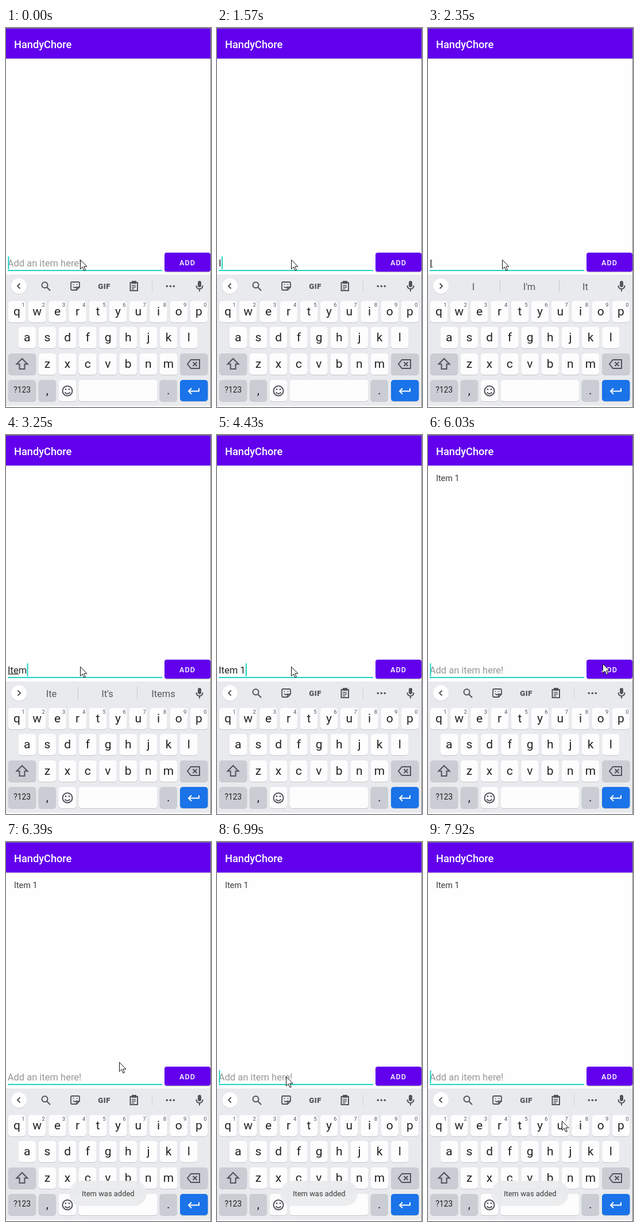
An HTML page that plays this animation: 357x658 px, repeating every 8000 ms.

```html
<!DOCTYPE html>
<html lang="en">
<head>
<meta charset="utf-8">
<title>To-do list</title>
<style>
  html, body { margin: 0; width: 100%; height: 100%; overflow: hidden; background: #fff; }
  svg { display: block; width: 357px; height: 658px; font-family: Roboto, "Noto Sans", sans-serif; }
  text { white-space: pre; }
  .mid { text-anchor: middle; }
  .icon { fill: none; stroke: #505359; stroke-width: 2; }
</style>
</head>
<body>
<svg viewBox="0 0 357 658">
  <defs>
    <clipPath id="btnClip"><rect x="276" y="390" width="80" height="33" rx="4"/></clipPath>
  </defs>
  <rect width="357" height="658" fill="#fefefe"/>
  <rect y="53" width="357" height="1.5" fill="#000" opacity=".1"/>
  <rect width="357" height="53" fill="#6200ee"/>
  <text x="14" y="35" font-size="18.2" font-weight="500" fill="#fff">HandyChore</text>
  <text id="item" x="14" y="80" font-size="14.4" fill="#3a3a3a">Item 1</text>

  <rect x="3" y="420" width="269" height="2" fill="#1fd3c6"/>
  <text id="hint" x="2.7" y="413.5" font-size="16.5" fill="#989898">Add an item here!</text>
  <text id="typed" x="3" y="413.5" font-size="16.5" fill="#222"></text>
  <rect id="under" x="3.5" y="414.5" height="1.2" fill="#222"/>
  <rect id="caret" y="396.5" width="2" height="22.5" fill="#1fd3c6"/>

  <rect id="lift" x="275.5" y="392" width="81" height="35" rx="5" fill="#000" opacity=".16"/>
  <rect x="276" y="391" width="80" height="33.5" rx="4" fill="#000" opacity=".2"/>
  <rect x="276" y="390" width="80" height="33" rx="4" fill="#6200ee"/>
  <circle id="ripple" cx="306" cy="400" fill="#fff" opacity=".24" clip-path="url(#btnClip)"/>
  <text x="302" y="411.5" font-size="12.6" font-weight="500" letter-spacing="1.12" fill="#fff">ADD</text>

  <rect y="428" width="357" height="228" fill="#e8eaed"/>
  <circle cx="22.5" cy="448.8" r="13.8" fill="#000" opacity=".1"/>
  <circle cx="22.5" cy="448" r="13.5" fill="#fff"/>
  <path id="chevron" class="icon"/>

  <g id="tools" class="icon">
    <circle cx="67.5" cy="446.3" r="5"/><path d="M71 450l6 6"/>
    <path d="M115 441h11q2 0 2 2v7l-5 5h-8q-2 0-2-2v-10q0-2 2-2zM128 450h-3q-2 0-2 2v3M117 449q3 4 6 0M117.5 444.5v1.5M123.5 444.5v1.5" stroke-width="1.8"/>
    <text class="mid" x="171.2" y="452.8" font-size="13.2" font-weight="900" letter-spacing=".5" fill="#505359" stroke="none">GIF</text>
    <path d="M216.5 442h12.5v14h-12.5z"/>
    <path d="M219 447h7M219 450h7M219 453h4.5" stroke-width="1.5"/>
    <path d="M220 440h6v3h-6z" fill="#505359"/>
    <path d="M254.5 438v20" stroke="#d0d2d6" stroke-width="1"/>
    <g fill="#505359" stroke="none">
      <circle cx="280.3" cy="448.3" r="1.8"/><circle cx="286.3" cy="448.3" r="1.8"/><circle cx="292.3" cy="448.3" r="1.8"/>
    </g>
  </g>
  <g id="words" font-size="16.5" fill="#56595e">
    <text class="mid" x="79" y="455"></text>
    <text class="mid" x="176.5" y="455"></text>
    <text class="mid" x="274" y="455"></text>
    <path d="M125.5 437v22M228.5 437v22" stroke="#c6c9cd"/>
  </g>
  <rect x="334" y="439" width="6" height="11" rx="3" fill="#505359"/>
  <path class="icon" d="M331.5 447q0 6 5.5 6t5.5-6M337 453v4.5" stroke-width="1.8"/>

  <g id="keys"></g>
  <path class="icon" d="M28 574l-9.5 9.5h5v8.5h9v-8.5h5z"/>
  <path class="icon" d="M322 576h15v15h-15l-6-7.5zM325.5 580l7 7M332.5 580l-7 7"/>
  <g class="icon">
    <circle cx="107" cy="630" r="8.5"/><path d="M102.5 632.5q4.5 5 9 0"/>
    <path d="M104 626v2.5M110 626v2.5" stroke-width="2.4"/>
  </g>
  <path class="icon" style="stroke:#fff" d="M336 625.5v5h-18M323 625.5l-5 5 5 5"/>

  <g id="toast">
    <rect x="110" y="588" width="135" height="44" rx="22" fill="#eaebec" opacity=".93"/>
    <text class="mid" x="177.8" y="615" font-size="12.95" fill="#3a3a3a">Item was added</text>
  </g>
  <path d="M0 .5h356.5v657.5" fill="none" stroke="#808080"/>
  <path id="mouse" d="M0 0v16l3.7-3.5 2.7 6.2 2.5-1-2.7-6h5.2z" fill="#fff" stroke="#111" stroke-linejoin="round"/>
</svg>
<script>
const $ = id => document.getElementById(id);

// Keyboard
const WHITE = '#fdfdfe', GREY = '#cacdd4', PITCH = 35.2;
let keys = '';
function key(x, y, w, label = '', fill = WHITE, size = 21) {
  const box = (dy, color) => `<rect x="${x}" y="${y + dy}" width="${w}" height="37" rx="5" fill="${color}"/>`;
  keys += box(1, '#c3c6ca') + box(0, fill) +
    `<text class="mid" x="${x + w / 2}" y="${y + 17.4 + size * 0.34}" font-size="${size}" fill="#202124">${label}</text>`;
}
function row(letters, x, y) {
  [...letters].forEach((c, i) => key(x + i * PITCH, y, 30.5, c));
}
row('qwertyuiop', 3.8, 474);
[...'1234567890'].forEach((n, i) => {
  keys += `<text class="mid" x="${30 + i * PITCH}" y="484" font-size="9.5" fill="#505359">${n}</text>`;
});
row('asdfghjkl', 21.5, 519);
row('zxcvbnm', 56.6, 565);
key(3.8, 565, 48.5, '', GREY);
key(303, 565, 48.5, '', GREY);
key(3.8, 611, 48.5, '?123', GREY, 13.8);
key(56.6, 611, 30.5, ',', GREY);
key(91.8, 611, 30.5);
key(126.5, 611, 137);
key(267.5, 611, 30.5, '.', GREY);
key(303, 611, 48.5, '', '#1a73e8');
$('keys').innerHTML = keys;

// Each step changes part of the screen state from its time on
const steps = [
  [0, { text: '', line: 0, caret: 1, words: null, mouse: [129.5, 402.5], ripple: 0, item: 0, toast: 0 }],
  [660, { caret: 0 }],
  [1160, { caret: 1 }],
  [1570, { text: 'I' }],
  [1820, { line: 1, words: ['I', "I'm", 'It'] }],
  [2350, { caret: 0 }],
  [2880, { text: 'It', caret: 1 }],
  [3130, { text: 'Ite', line: 2, words: ['It', "It's", 'Its'] }],
  [3250, { text: 'Item', line: 3, words: ['Ite', "It's", 'Items'] }],
  [3530, { line: 4, words: ['Item', 'Items', 'Itemized'] }],
  [3780, { line: 0, words: ['is', 'in', 'for'] }],
  [4310, { text: 'Item 1' }],
  [4430, { words: null }],
  [4820, { caret: 0 }],
  [5070, { mouse: [264.5, 292.5] }],
  [5220, { mouse: [297.5, 324.5] }],
  [5340, { mouse: [314.5, 362.5], caret: 1 }],
  [5500, { mouse: [304.5, 397.5] }],
  [5640, { ripple: 25 }],
  [5760, { ripple: 45 }],
  [5880, { ripple: 70, caret: 0 }],
  [6030, { ripple: 0, text: '', caret: 1, item: 1 }],
  [6150, { mouse: [290.5, 394.5], toast: 0.4 }],
  [6270, { mouse: [246.5, 387.5], toast: 0.8 }],
  [6390, { mouse: [197.5, 382.5], toast: 1, caret: 0 }],
  [6510, { mouse: [165.5, 385.5] }],
  [6630, { mouse: [142.5, 390.5] }],
  [6750, { mouse: [127.5, 395.5] }],
  [6870, { mouse: [122.5, 402.5], caret: 1 }],
  [6990, { mouse: [120.5, 407.5] }],
  [7390, { mouse: [128.5, 418.5], caret: 0 }],
  [7510, { mouse: [142.5, 437.5] }],
  [7650, { mouse: [183.5, 456.5] }],
  [7770, { mouse: [220.5, 472.5] }],
  [7920, { mouse: [233.5, 484.5], caret: 1 }]
];

const set = (id, name, value) => $(id).setAttribute(name, value);
const show = (id, on) => set(id, 'visibility', on ? 'visible' : 'hidden');

function draw(time) {
  const s = Object.assign({}, ...steps.filter(([t]) => t <= time).map(([, change]) => change));
  const typed = $('typed');
  typed.textContent = s.text;
  const width = s.text ? typed.getComputedTextLength() : 0;
  const lined = s.line ? typed.getSubStringLength(0, s.line) : 0;
  set('caret', 'x', 3.4 + width);
  set('under', 'width', lined);
  show('caret', s.caret);
  show('hint', !s.text);
  show('item', s.item);
  show('tools', !s.words);
  show('words', s.words);
  if (s.words) document.querySelectorAll('#words text').forEach((el, i) => el.textContent = s.words[i]);
  set('chevron', 'd', s.words ? 'M20.5 443.5l4.5 4.5-4.5 4.5' : 'M24.5 443.5l-4.5 4.5 4.5 4.5');
  set('ripple', 'r', s.ripple);
  show('lift', s.ripple);
  set('toast', 'opacity', s.toast);
  set('mouse', 'transform', `translate(${s.mouse})`);
}

let start;
function tick(now) {
  start ??= now;
  draw((now - start) % 8000);
  requestAnimationFrame(tick);
}
draw(0);
requestAnimationFrame(tick);
</script>
</body>
</html>
```
